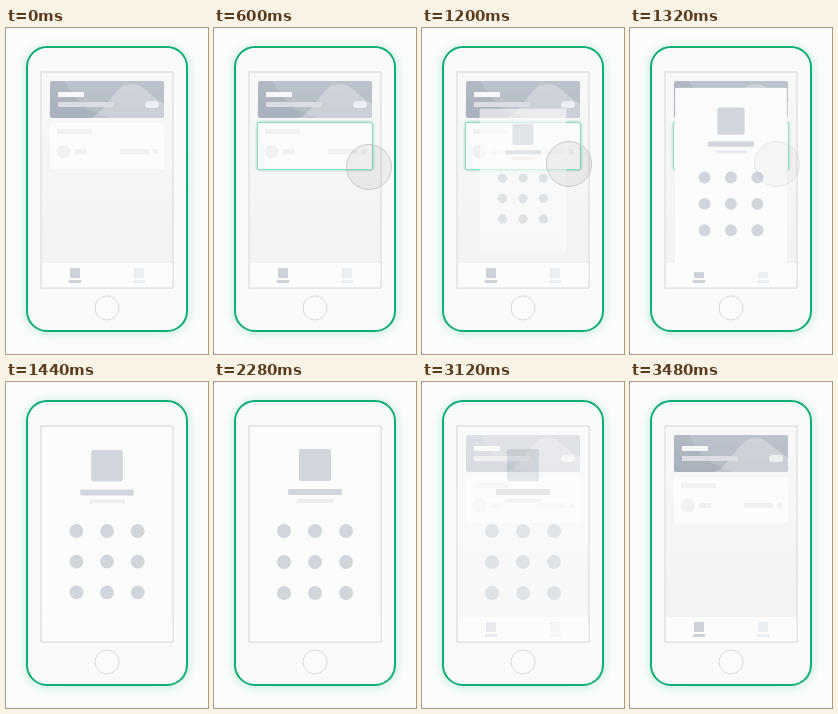
An HTML page for the animation above (3.6 s loop, 202 px wide and 326 px high).

```html
<!DOCTYPE html>
<html lang="en">
<head>
<meta charset="utf-8">
<title>Phone unlock</title>
<style>
html, body { margin: 0; width: 100%; height: 100%; overflow: hidden; background: #fcfcfc; }
svg { display: block; width: 202px; height: 326px; }
</style>
</head>
<body>
<svg viewBox="0 0 202 326" xmlns="http://www.w3.org/2000/svg">
  <defs>
    <filter id="halo" x="-30%" y="-20%" width="160%" height="140%"><feGaussianBlur stdDeviation="6"/></filter>
    <filter id="soft" x="-20%" y="-30%" width="140%" height="160%"><feGaussianBlur stdDeviation="1.8"/></filter>
    <clipPath id="screen"><rect x="35.5" y="44" width="131.5" height="216"/></clipPath>
    <clipPath id="banner"><rect x="44" y="53" width="114" height="37" rx="2"/></clipPath>
    <linearGradient id="wall" x1="0" y1="0" x2="0" y2="1">
      <stop offset="0" stop-color="#f8f8f8"/><stop offset="1" stop-color="#f2f2f2"/>
    </linearGradient>
    <linearGradient id="steel" x1="0" y1="0" x2="0" y2="1">
      <stop offset="0" stop-color="#b2b9c3"/><stop offset="1" stop-color="#aab1bc"/>
    </linearGradient>
  </defs>

  <rect x="21" y="20" width="160" height="284" rx="21" fill="#12b87a" opacity=".32" filter="url(#halo)"/>
  <rect x="21" y="19" width="160" height="284" rx="20" fill="#fafafa" stroke="#0fae72" stroke-width="2"/>
  <circle cx="101" cy="280" r="12" fill="#fbfbfb" stroke="#dadada"/>

  <g clip-path="url(#screen)">
    <rect x="35" y="44" width="132" height="216" fill="url(#wall)"/>
    <g clip-path="url(#banner)">
      <rect x="44" y="53" width="114" height="37" fill="url(#steel)"/>
      <path d="M59 53C67 70 80 84 104 90H158V53Z" fill="#fff" opacity=".14"/>
      <path d="M84 90C100 86 108 56 125 56C139 56 145 70 158 75V90Z" fill="#fff" opacity=".28"/>
    </g>
    <rect x="52" y="64" width="26" height="5" fill="#f5f7f8"/>
    <rect x="52" y="74" width="56" height="5" fill="#dadee3"/>
    <rect x="139" y="73" width="14" height="7" rx="3.5" fill="#eceff1"/>

    <g id="glow">
      <rect x="43" y="94" width="116" height="48" rx="2" fill="#12b87a" opacity=".55" filter="url(#soft)"/>
      <rect x="43.5" y="94.5" width="115" height="47" rx="2" fill="none" stroke="#8fdcbd"/>
    </g>
    <rect x="44" y="95" width="114" height="46" rx="1.5" fill="#fcfcfc"/>
    <g fill="#eff1f2">
      <rect x="51" y="101" width="35" height="5"/>
      <circle cx="57.5" cy="123.5" r="7"/>
      <rect x="69" y="121" width="12" height="5"/>
      <rect x="114" y="121" width="29" height="5"/>
      <rect x="147" y="121" width="5" height="5" rx="1"/>
    </g>

    <rect x="35" y="235" width="132" height="25" fill="#fcfcfc"/>
    <g fill="#ccd2d8">
      <rect x="64" y="240" width="10" height="10"/>
      <rect x="63" y="252" width="12" height="3"/>
    </g>
    <g fill="#ebeff1">
      <rect x="128" y="240" width="10" height="10"/>
      <rect x="127" y="252" width="12" height="3"/>
    </g>

    <g id="lock">
      <rect x="35.5" y="44" width="131" height="216" fill="#fcfcfc"/>
      <g id="pad" fill="#d1d6dc">
        <rect x="85" y="67" width="32" height="32" rx="2.5"/>
        <rect x="74" y="107" width="54" height="6" rx="1"/>
        <rect x="83" y="117" width="36" height="4" fill="#ededef"/>
      </g>
    </g>
  </g>
  <rect x="35" y="44" width="132" height="216" fill="none" stroke="#d6d6d6"/>

  <circle id="touch" r="22.5" fill="#000" fill-opacity=".055" stroke="#c6cac9"/>
</svg>
<script>
const LOOP = 3600;
const $ = id => document.getElementById(id);
const glow = $('glow'), lock = $('lock'), touch = $('touch');

for (const y of [149, 180, 211]) {
  for (const x of [70, 101, 132]) {
    const dot = document.createElementNS('http://www.w3.org/2000/svg', 'circle');
    dot.setAttribute('cx', x);
    dot.setAttribute('cy', y);
    dot.setAttribute('r', 7);
    $('pad').append(dot);
  }
}

const ramp = (t, a, b) => Math.min(1, Math.max(0, (t - a) / (b - a)));
const smooth = p => p * p * (3 - 2 * p);

function draw(t) {
  const rest = Math.pow(1 - ramp(t, 0, 1200), 1.4);
  touch.setAttribute('cx', 147 + 21 * rest);
  touch.setAttribute('cy', 136 + 8 * rest);
  touch.setAttribute('opacity', ramp(t, 0, 400) * (1 - ramp(t, 1220, 1400)));

  glow.setAttribute('opacity', smooth(ramp(t, 100, 560)) * (1 - ramp(t, 1300, 1500)));

  const open = ramp(t, 1056, 1480);
  const scale = 0.535 + 0.465 * smooth(open);
  const fade = 1 - smooth(ramp(t, 2820, 3480));
  lock.setAttribute('transform', `translate(101 152) scale(${scale}) translate(-101 -152)`);
  lock.setAttribute('opacity', Math.min(1, open * 1.8) * fade);
}

function tick() {
  draw(performance.now() % LOOP);
  requestAnimationFrame(tick);
}
tick();
</script>
</body>
</html>
```
